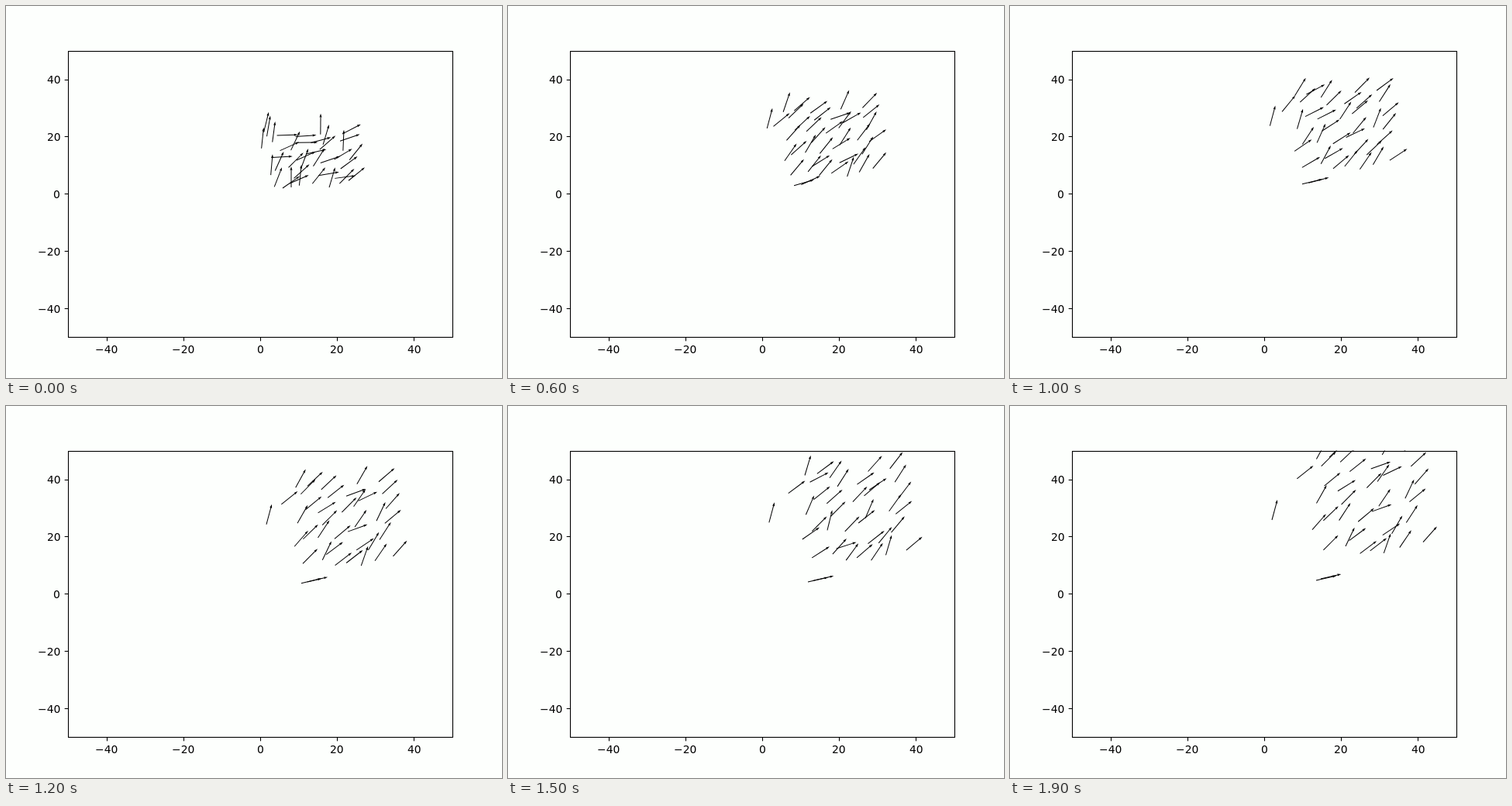
Recreate the animation shown at these times as an HTML page with a canvas. Size 640x480 px, loop 2000 ms.

```html
<!DOCTYPE html>
<html lang="en">
<head>
<meta charset="utf-8">
<title>Flock of arrows</title>
<style>
  html, body { margin: 0; width: 100%; height: 100%; overflow: hidden; background: #fdfffd; }
  canvas { display: block; }
</style>
</head>
<body>
<canvas id="plot" width="640" height="480"></canvas>
<script>
const ctx = document.getElementById("plot").getContext("2d");
const STEP = 100, STEPS = 20;
const BOX = { left: 80, top: 57.6, width: 496, height: 369.6 };
const TICKS = [-40, -20, 0, 20, 40];
const FLOCK_SIZE = 37;

const lerp = (a, b, p) => a + (b - a) * p;
const fract = v => v - Math.floor(v);

// Repeatable random number from -1 to 1.
const noise = seed => fract(Math.sin(seed * 12.9898) * 43758.5453) * 2 - 1;

// Arrows that stay apart from the flock.
const loners = [
  { from: { x: 332.5, y: 163, angle: 76 }, to: { x: 338, y: 147, angle: 75 } },
  { from: { x: 357, y: 235, angle: 35 }, to: { x: 395, y: 225, angle: 13 } },
  { from: { x: 368, y: 234, angle: 90 }, to: { x: 401, y: 223, angle: 13 } }
].map(loner => ({ ...loner, sway: 0, phase: 0 }));

// Evenly scattered start; the flock fans out as it climbs to the right.
function makeBird(_, i) {
  const across = fract(0.5 + (i + 1) * 0.7549);
  const up = fract(0.5 + (i + 1) * 0.5698);
  const from = {
    x: 332 + 120 * across + 4 * noise(i + 1),
    y: 236 - 77 * up + 4 * noise(i + 50),
    angle: 45 + 45 * noise(i + 100)
  };
  const to = {
    x: from.x + 50 + 35 * across + 10 * noise(i + 150),
    y: from.y - 45 - 62 * up + 8 * noise(i + 200),
    angle: 47 + 20 * noise(i + 250)
  };
  return { from, to, sway: 10, phase: Math.PI * noise(i + 300) };
}

const arrows = [...loners, ...Array.from({ length: FLOCK_SIZE }, makeBird)];

function line(x1, y1, x2, y2) {
  ctx.beginPath();
  ctx.moveTo(x1, y1);
  ctx.lineTo(x2, y2);
  ctx.stroke();
}

function drawArrow(x, y, degrees) {
  const length = 27, head = 5;
  ctx.save();
  ctx.translate(x, y);
  ctx.rotate(-degrees * Math.PI / 180);
  ctx.fillRect(0, -0.5, length - head + 0.5, 1);
  ctx.beginPath();
  ctx.moveTo(length, 0);
  ctx.lineTo(length - head, -1.5);
  ctx.lineTo(length - head + 0.5, 0);
  ctx.lineTo(length - head, 1.5);
  ctx.fill();
  ctx.restore();
}

function drawArrows(step) {
  const p = step / (STEPS - 1);
  // Headings align well before the trip is over.
  const aligned = 1 - (1 - p) ** 5;
  ctx.save();
  ctx.beginPath();
  ctx.rect(BOX.left, BOX.top, BOX.width, BOX.height);
  ctx.clip();
  for (const { from, to, sway, phase } of arrows) {
    const angle = lerp(from.angle, to.angle, aligned) + sway * aligned * Math.sin(step * 0.9 + phase);
    drawArrow(lerp(from.x, to.x, p), lerp(from.y, to.y, p), angle);
  }
  ctx.restore();
}

// Text starts on a whole pixel; anchor is 0.5 for centred, 1 for right-aligned.
function drawLabel(text, x, y, anchor) {
  const left = x - ctx.measureText(text).width * anchor;
  ctx.fillText(text, Math.round(left), Math.round(y));
}

function drawAxes() {
  const left = 80.5, bottom = 427.5, tick = 4.86;
  ctx.lineWidth = 1.11;
  ctx.strokeRect(left, 58.5, 496, 369);
  ctx.font = "13.89px 'DejaVu Sans', sans-serif";
  for (const value of TICKS) {
    const label = String(value).replace("-", "\u2212");
    const x = BOX.left + (value + 50) / 100 * BOX.width;
    const y = BOX.top + (50 - value) / 100 * BOX.height;
    const snapX = Math.round(x) + 0.5, snapY = Math.round(y) + 0.5;
    line(snapX, bottom, snapX, bottom + tick);
    line(left, snapY, left - tick, snapY);
    drawLabel(label, x, 448, 0.5);
    drawLabel(label, 70.3, y + 5.3, 1);
  }
}

function render(now) {
  ctx.fillStyle = "#fdfffd";
  ctx.fillRect(0, 0, 640, 480);
  ctx.fillStyle = ctx.strokeStyle = "#000";
  drawArrows(Math.floor(now / STEP) % STEPS);
  drawAxes();
}

function loop() {
  render(performance.now());
  requestAnimationFrame(loop);
}
loop();
</script>
</body>
</html>
```
